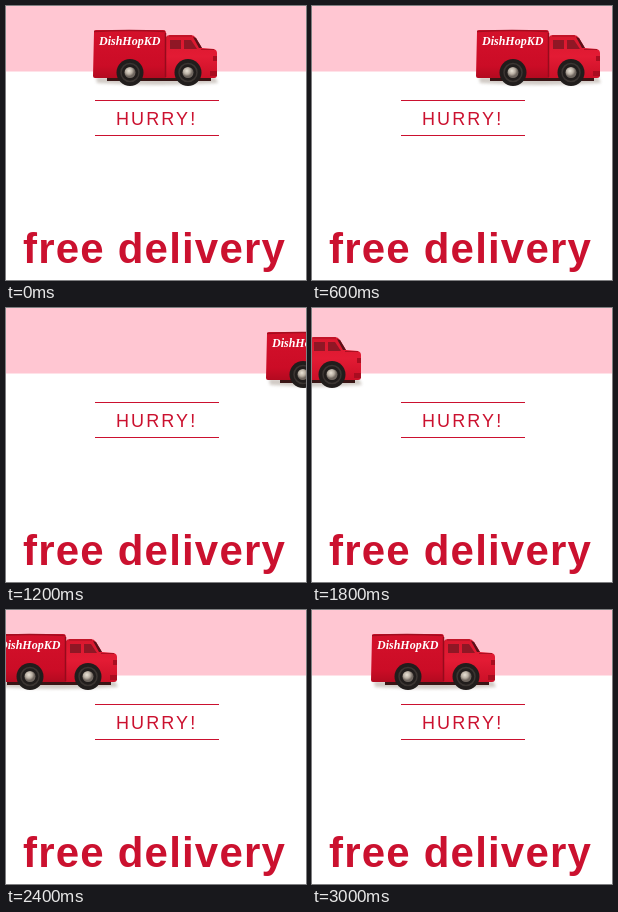
These frames come from a looping animation (300 by 274 pixels, 3300 ms). An HTML page:

```html
<!DOCTYPE html>
<html lang="en">
<head>
<meta charset="utf-8">
<title>Free delivery</title>
<style>
  html, body { margin: 0; width: 100%; height: 100%; overflow: hidden; background: #fff; }
  svg { display: block; width: 300px; height: 274px; }
  text { font-family: "Liberation Sans", Arial, sans-serif; fill: #cb112f; }
  .hurry { font-size: 18px; letter-spacing: 2.1px; }
  .offer { font-size: 42px; font-weight: bold; letter-spacing: 1.2px; }
  .brand { font: italic bold 12px "Liberation Serif", "Times New Roman", serif; fill: #fff; }
</style>
</head>
<body>
<svg viewBox="0 0 300 274">
  <defs>
    <linearGradient id="box" x2="0" y2="1">
      <stop offset="0" stop-color="#d4112b"/>
      <stop offset=".75" stop-color="#cb0c26"/>
      <stop offset="1" stop-color="#b30a20"/>
    </linearGradient>
    <linearGradient id="cab" x2="0" y2="1">
      <stop offset="0" stop-color="#d9182e"/>
      <stop offset=".5" stop-color="#e31b34"/>
      <stop offset="1" stop-color="#cb1027"/>
    </linearGradient>
    <radialGradient id="hub" cx=".4" cy=".35">
      <stop offset="0" stop-color="#e9e2d6"/>
      <stop offset=".6" stop-color="#b8aea2"/>
      <stop offset="1" stop-color="#6f665f"/>
    </radialGradient>
    <filter id="soft" x="-10%" y="-60%" width="120%" height="220%">
      <feGaussianBlur stdDeviation="1.5"/>
    </filter>
    <g id="wheel">
      <circle r="13.5" fill="#211d1c"/>
      <circle r="9" fill="none" stroke="#3b3532" stroke-width="1.5"/>
      <circle r="5.5" fill="url(#hub)"/>
    </g>
  </defs>

  <rect width="300" height="65.5" fill="#ffc6d2"/>

  <!-- The truck's rear edge sits at x = 0 -->
  <g id="truck">
    <path d="M3 71H122L125 77Q65 81 4 77Z" fill="#8c7d70" opacity=".4" filter="url(#soft)"/>
    <path d="M14 66H118V75H14Z" fill="#3a1515"/>
    <path d="M73 31Q74 29 77 29H98Q101 29 103 32L109 42L121 43Q124 44 124 47V69Q124 72 121 72H73Z" fill="url(#cab)"/>
    <path d="M77 34H88V43H77ZM91 34H98L104 43H91Z" fill="#8f1725"/>
    <path d="M100 31L103 32L109 42H106Z" fill="#5a1119"/>
    <path d="M76 30H99M108 43.5H121" stroke="#ab1022" fill="none"/>
    <path d="M120 50H124V55H120ZM117 65H124V70H117Z" fill="#a90d20"/>
    <path d="M1 26Q1 24 3 24H70Q73 24 73 27V72H2Q0 72 0 70Z" fill="url(#box)"/>
    <path d="M1 25.5Q36 23.5 72 25.5" stroke="#a30c1e" stroke-width="1.5" fill="none"/>
    <path d="M72.5 27V71" stroke="#960b1c" stroke-width="1.5"/>
    <use href="#wheel" x="37" y="66.5"/>
    <use href="#wheel" x="95" y="66.5"/>
    <text class="brand" x="6" y="39">DishHopKD</text>
  </g>

  <path d="M89 94.5H213M89 129.5H213" stroke="#cb112f"/>
  <text class="hurry" x="110" y="119">HURRY!</text>
  <text class="offer" x="17" y="257">free delivery</text>
</svg>
<script>
  const STEP = 300;
  // Rear edge at each step; 310 is out of view
  const stops = [87, 126, 164, 215, 260, 310, -75, -46, -13, 23, 59];
  const truck = document.getElementById("truck");

  function draw() {
    const step = Math.floor(performance.now() / STEP) % stops.length;
    truck.setAttribute("transform", `translate(${stops[step]} 0)`);
    requestAnimationFrame(draw);
  }
  draw();
</script>
</body>
</html>
```
